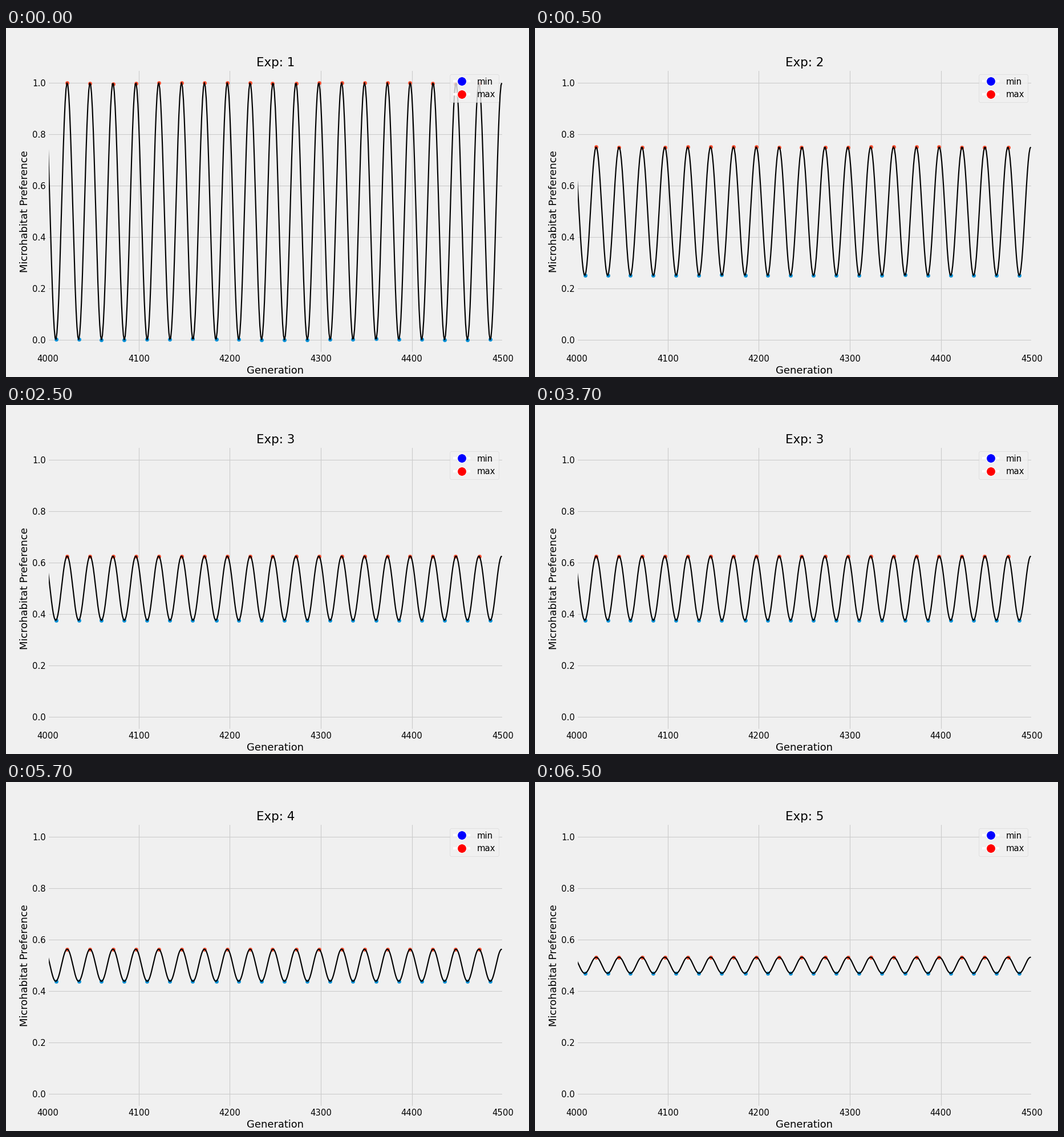
A matplotlib script that plays this animation: 917x611 px, repeating every 8000 ms.

```python
import numpy as np
import matplotlib.pyplot as plt
from matplotlib.animation import FuncAnimation
from matplotlib.lines import Line2D

WIDTH, HEIGHT, DPI = 917, 611, 76.375
STEP_MS, LOOP_MS = 500, 8000

plt.style.use("fivethirtyeight")
plt.rcParams["font.family"] = "DejaVu Sans"

fig, ax = plt.subplots(figsize=(WIDTH / DPI, HEIGHT / DPI), dpi=DPI)
ax.set(xlim=(4000, 4500), ylim=(-0.05, 1.05),
       xlabel="Generation", ylabel="Microhabitat Preference")
title = ax.set_title("Exp: 1")

generations = np.arange(4000, 4500)
wave = np.cos(generations / 4)

# Strict interior extrema of the sampled wave.
slope = np.diff(wave)
minima = np.flatnonzero((slope[:-1] < 0) & (slope[1:] > 0)) + 1
maxima = np.flatnonzero((slope[:-1] > 0) & (slope[1:] < 0)) + 1

line, = ax.plot([], [], color="black", linewidth=2)
min_dots = ax.scatter(generations[minima], wave[minima], color="#008fd5")
max_dots = ax.scatter(generations[maxima], wave[maxima], color="#fc4f30")


def legend_dot(color, label):
    return Line2D([0], [0], marker="o", color="w", label=label,
                  markerfacecolor=color, markersize=15)


ax.legend(handles=[legend_dot("b", "min"), legend_dot("r", "max")],
          loc="upper right")


def update(frame):
    experiment = (frame + 3) // 4 + 1
    preference = 0.5 + 0.5 ** experiment * wave
    line.set_data(generations, preference)
    for dots, where in ((min_dots, minima), (max_dots, maxima)):
        dots.set_offsets(np.column_stack((generations[where], preference[where])))
    title.set_text(f"Exp: {experiment}")
    return line, min_dots, max_dots, title


anim = FuncAnimation(fig, update, frames=LOOP_MS // STEP_MS,
                     interval=STEP_MS, repeat=True, repeat_delay=0)
plt.show()
```
